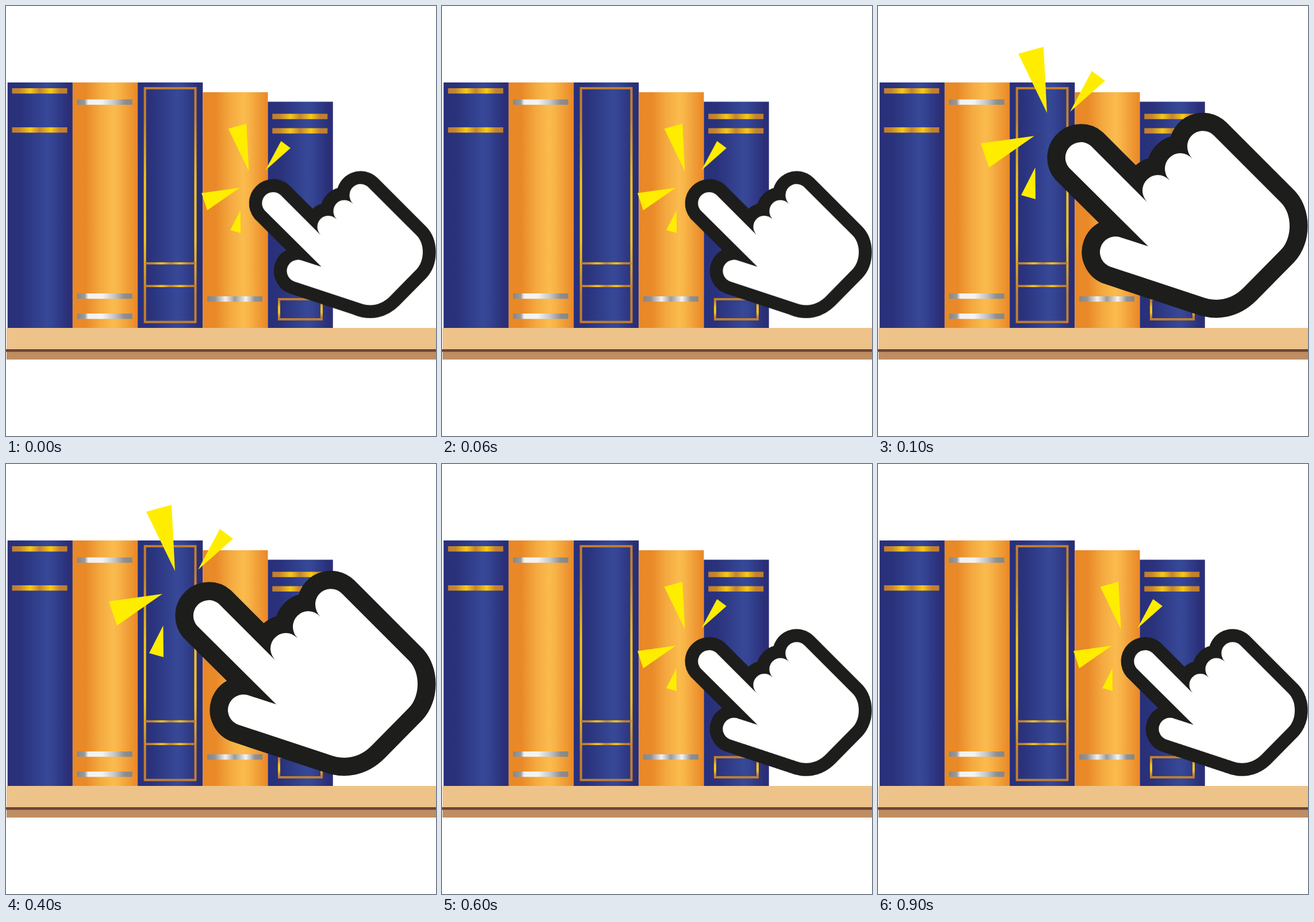
Animation, 748 px wide and 748 px high, one loop 1100 ms. Source, as an HTML page:

```html
<!DOCTYPE html>
<html lang="en">
<head>
<meta charset="utf-8">
<title>Bookshelf pointer</title>
<style>
  html, body { margin: 0; width: 100%; height: 100%; overflow: hidden; background: #fff; }
  svg { display: block; width: 100%; height: 100%; }
  #pointer { transform-box: view-box; transform-origin: 748px 544px; }
</style>
</head>
<body>
<svg viewBox="0 0 748 748">
  <defs id="gradients"></defs>
  <g id="books"></g>
  <g id="shelf">
    <rect x="1" y="560" width="747" height="38" fill="#edc389"/>
    <rect x="1" y="601" width="747" height="14" fill="#bf8d62"/>
    <rect y="597" width="748" height="4.5" fill="#6b4337"/>
  </g>
  <g id="pointer">
    <path fill="#ffed00" d="M244 83 288 71 294 186Z M372 113 395 130 334 184Z
      M179 239 272 226 193 281Z M273.500 281 274 336 249 329Z"/>
    <path fill="#fff" stroke="#1d1d1b" stroke-width="63" stroke-linejoin="round" paint-order="stroke"
      d="M332 281 A27 27 0 0 1 370 243 L468 341
      Q460 331 460 321 A27 27 0 0 1 487 294 Q498 294 507 303
      Q499 294 499 283 A27 27 0 0 1 526 256 Q538 256 547 266
      Q538 256 538 244 A27 27 0 0 1 584 225
      L701 342 C721 362 721 403 701 424
      L636 490 C616 510 590 517 560 505
      L404.700 453.700 A27 27 0 0 1 421.300 402.300 L470 418Z"/>
  </g>
</svg>
<script>
const NS = 'http://www.w3.org/2000/svg';
const $ = id => document.getElementById(id);

function add(parent, tag, attrs) {
  const node = document.createElementNS(NS, tag);
  for (const key in attrs) node.setAttribute(key, attrs[key]);
  parent.append(node);
  return node;
}

function gradient(id, stops, vertical = false) {
  const g = add($('gradients'), 'linearGradient',
    vertical ? { id, x1: 0, y1: 0, x2: 0, y2: 1 } : { id });
  for (const [offset, color] of stops) add(g, 'stop', { offset, 'stop-color': color });
}

gradient('blue', [[0, '#29307a'], [.2, '#2a327c'], [.6, '#364897'], [.68, '#354594'], [.93, '#2a2f78'], [1, '#292e76']]);
gradient('orange', [[0, '#e98826'], [.2, '#e98928'], [.42, '#f4a93f'], [.62, '#fbbb4d'], [.7, '#f8b548'], [1, '#e98727']]);
gradient('gold', [[0, '#bf7d30'], [.14, '#c58730'], [.33, '#f6c817'], [.5, '#c48430'], [.7, '#f8ca13'], [.86, '#c38430'], [1, '#bf7d30']]);
gradient('goldFrame', [[0, '#bf7d30'], [.12, '#c28230'], [.4, '#f3c318'], [.65, '#f6c817'], [.88, '#c28230'], [1, '#bf7d30']], true);
gradient('silver', [[0, '#878787'], [.14, '#9b9b9b'], [.2, '#f2f2f2'], [.45, '#f4f4f4'], [.68, '#c4c4c4'], [.86, '#8e8e8e'], [1, '#868686']]);
gradient('silverTwin', [[0, '#878787'], [.14, '#939393'], [.33, '#f2f2f2'], [.5, '#9b9b9b'], [.7, '#f4f4f4'], [.86, '#929292'], [1, '#868686']]);

function rect(x, y, width, height, fill) {
  add($('books'), 'rect', { x, y, width, height, fill: `url(#${fill})` });
}

function frame(x, y, width, height) {
  add($('books'), 'rect', { x, y, width, height, fill: 'none', stroke: 'url(#goldFrame)', 'stroke-width': 4 });
}

const BOOK_WIDTH = 113.2;
const books = [
  { top: 133, cover: 'blue', trim: 'gold', bars: [143, 211] },
  { top: 133, cover: 'orange', trim: 'silver', bars: [162.5, 500, 535] },
  { top: 133, cover: 'blue', trim: 'gold', bars: [] },
  { top: 150, cover: 'orange', trim: 'silverTwin', bars: [505] },
  { top: 166.5, cover: 'blue', trim: 'gold', bars: [187.5, 212.5] },
];
books.forEach(({ top, cover, trim, bars }, i) => {
  const x = 2.7 + i * BOOK_WIDTH;
  rect(x, top, BOOK_WIDTH, 560 - top, cover);
  for (const y of bars) rect(x + 7.8, y, 96, 9.3, trim);
});

frame(241.7, 143, 87.8, 406.7);
rect(242, 445.8, 87.5, 3.7, 'gold');
rect(242, 485.3, 87.5, 3.7, 'gold');
frame(475, 510, 74, 35);

// The hand jumps between its small and full size, anchored at its lower right.
const LOOP = 1100;
const poses = [[0, .717], [100, 1], [600, .717], [LOOP, .717]];
$('pointer').animate(
  poses.map(([time, scale]) => ({ offset: time / LOOP, transform: `scale(${scale})`, easing: 'step-end' })),
  { duration: LOOP, iterations: Infinity }
);
</script>
</body>
</html>
```
